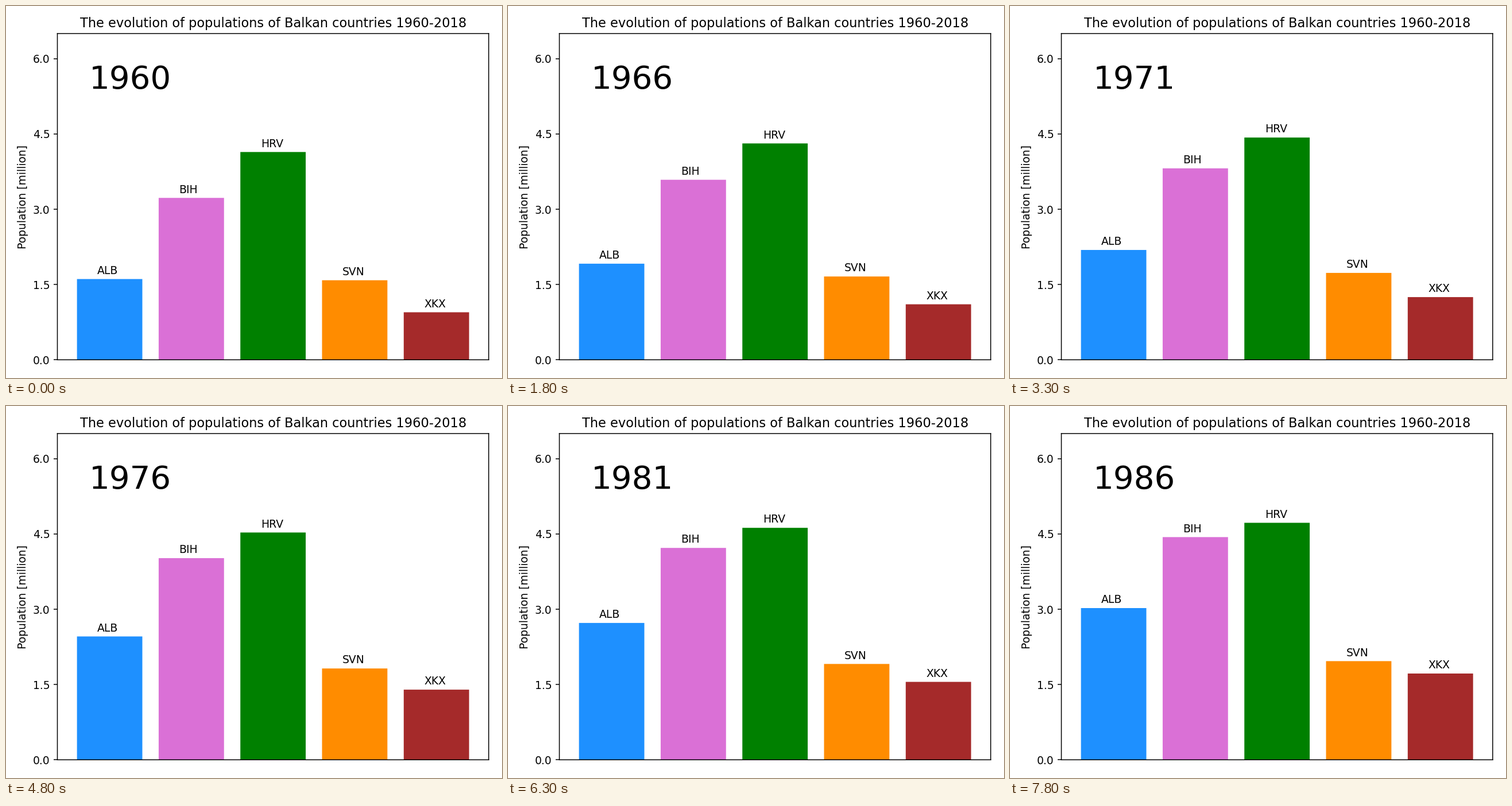
Recreate the animation shown at these times as a matplotlib script. Size 864 by 648 pixels, loop 8 s.

```python
import numpy as np
import matplotlib.pyplot as plt
from matplotlib.animation import FuncAnimation

WIDTH, HEIGHT, DPI = 864, 648, 135
FRAME_MS, LOOP_MS, YEAR_MS = 100, 8000, 300
FIRST_YEAR, MID_YEAR, HALF_SPAN = 1960, 1973, 13
LABEL_SHIFT, LABEL_GAP = -0.15, 0.1

# Populations in millions at a few key years; a smooth curve joins them.
KEY_YEARS = np.array([1960, 1966, 1973, 1980, 1986])
COUNTRIES = {
    "ALB": ("dodgerblue", [1.609, 1.915, 2.297, 2.672, 3.023]),
    "BIH": ("orchid", [3.226, 3.587, 3.897, 4.180, 4.437]),
    "HRV": ("green", [4.140, 4.311, 4.470, 4.603, 4.722]),
    "SVN": ("darkorange", [1.585, 1.660, 1.765, 1.893, 1.966]),
    "XKX": ("brown", [0.947, 1.106, 1.308, 1.521, 1.719]),
}

plt.rcParams["font.family"] = "DejaVu Sans"


def scaled(year):
    return (year - MID_YEAR) / HALF_SPAN


key_values = np.transpose([values for _, values in COUNTRIES.values()])
growth = np.polyfit(scaled(KEY_YEARS), key_values, len(KEY_YEARS) - 1)


def populations(year):
    return np.polyval(growth, scaled(year))


def pixel_rect(left, top, right, bottom):
    return [left / WIDTH, 1 - bottom / HEIGHT,
            (right - left) / WIDTH, (bottom - top) / HEIGHT]


fig = plt.figure(figsize=(WIDTH / DPI, HEIGHT / DPI), dpi=DPI, facecolor="white")
ax = fig.add_axes(pixel_rect(89.5, 48, 840.8, 616.3))
ax.set_title("The evolution of populations of Balkan countries 1960-2018", fontsize=12)
ax.set_ylabel("Population [million]", fontsize=10)
ax.set_xlim(-0.64, 4.64)
ax.set_ylim(0, 6.5)
ax.set_xticks([])
ax.set_yticks(np.arange(0, 6.5, 1.5))
ax.yaxis.set_major_formatter("{x:.1f}")

bars = ax.bar(range(len(COUNTRIES)), populations(FIRST_YEAR), width=0.8,
              color=[color for color, _ in COUNTRIES.values()])
for patch in [*bars, *ax.spines.values()]:
    patch.set_snap(False)
labels = [ax.text(i + LABEL_SHIFT, 0, code, fontsize=10)
          for i, code in enumerate(COUNTRIES)]
year_text = ax.text(-0.25, 5.4, "", fontsize=30)


def update(frame):
    year = FIRST_YEAR + frame * FRAME_MS // YEAR_MS
    year_text.set_text(str(year))
    for bar, label, value in zip(bars, labels, populations(year)):
        bar.set_height(value)
        label.set_y(value + LABEL_GAP)
    return [*bars, *labels, year_text]


anim = FuncAnimation(fig, update, frames=LOOP_MS // FRAME_MS, interval=FRAME_MS,
                     init_func=lambda: update(0), repeat=True, repeat_delay=0)
plt.show()
```
